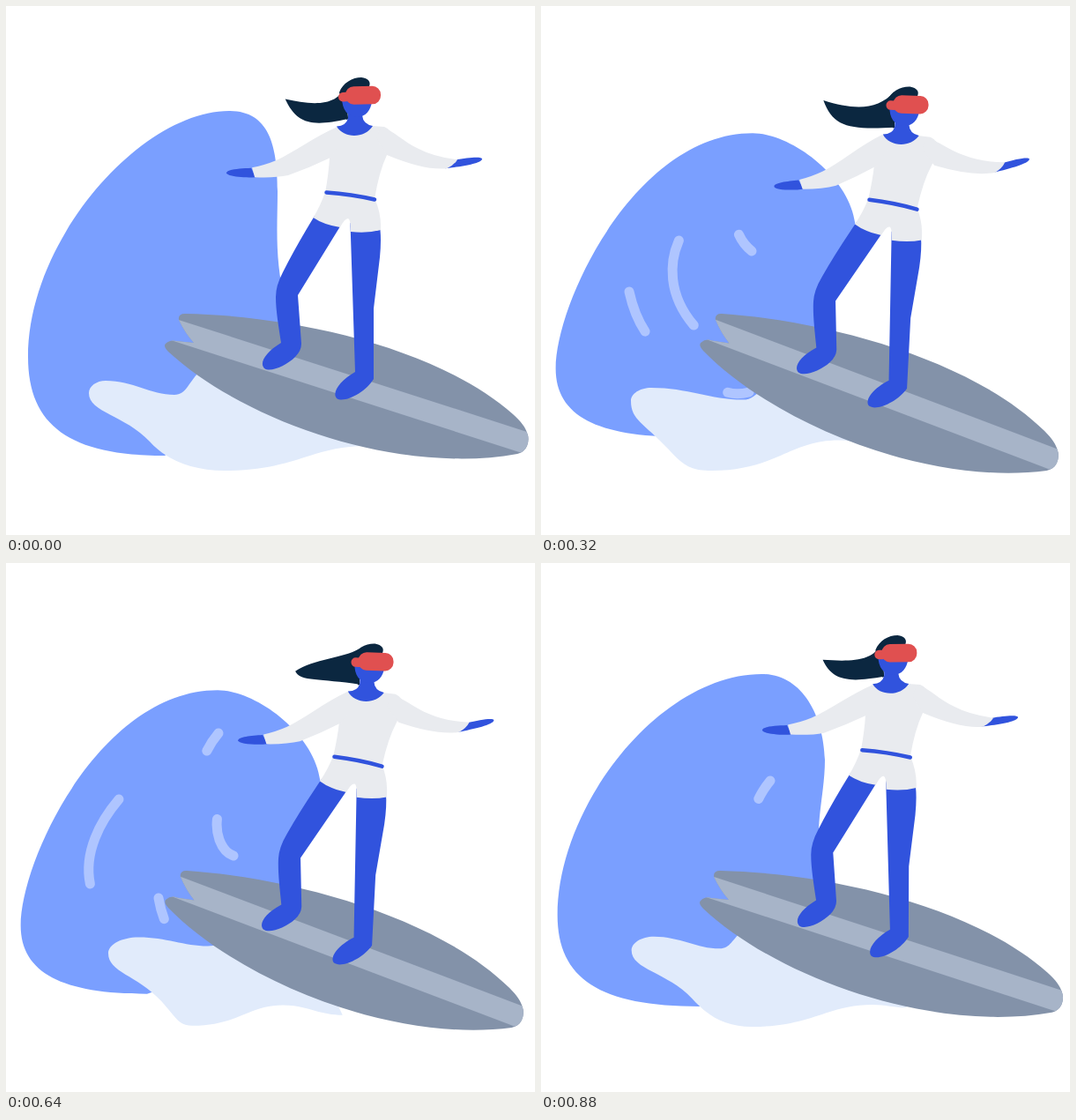
These frames come from a looping animation (600 px wide and 600 px high, 960 ms). An HTML page:

```html
<!DOCTYPE html>
<html lang="en">
<head>
<meta charset="utf-8">
<title>Surfer</title>
<style>
  html, body { margin: 0; width: 100%; height: 100%; overflow: hidden; background: #fff; }
  svg { display: block; width: 100vw; height: 100vh; }
  .skin { fill: #3153dd; }
  .cloth { fill: #e9ebef; }
  .hair { fill: #0b2740; }
  .mask { fill: #e05050; }
  #spray path { fill: none; stroke: #afc5ff; stroke-width: 11; stroke-linecap: round; }
</style>
</head>
<body>
<svg viewBox="0 0 600 600">
  <defs>
    <clipPath id="deck">
      <path id="outline" d="M203,349 C322,351 488,386 575,463 C585,472 589,478 591,484 Q594,491 591,499 Q588,506 580,508
        C450,532 273,474 184,392 Q178,386 181,383 Q186,378 193,380 L213,382 Q203,371 196,356 Q195,349 203,349Z"/>
    </clipPath>
  </defs>
  <path id="wave" fill="#7a9fff"/>
  <path id="foam" fill="#e1ebfb"/>
  <g id="spray"></g>
  <g class="tilt">
    <use href="#outline" fill="#8392a9"/>
    <path clip-path="url(#deck)" fill="#a7b4c8" d="M180,350.9 L610,489.1 L610,515 L180,376.8Z"/>
  </g>
  <path id="tail" class="hair"/>
  <g class="tilt">
    <path class="skin" d="M350,238 L379,250 L331,328 L335,383 Q335,391 328,398 C318,408 300,416 293,411
      C287,405 294,393 312,382 C309,362 306,345 306,330 Q306,317 314,302 Q328,274 350,238Z"/>
    <path class="skin" d="M390.5,246 L424,250 Q426,264 424,285 L417,343 L417,423 C408,438 384,451 375,445
      C369,438 380,424 396,415Z"/>
    <path class="cloth" d="M362,211 Q357,226 348.5,240 Q360,248 379,251 Q384,241 388,241 Q391,242 391,256
      Q410,258 425,254 Q426,236 418,218Z"/>
    <path class="cloth" d="M375,137 Q395,141 415,136 L429,137 Q437,140 440,150 L432,169 Q423,188 418,219
      L362,212 Q366,190 367,172 L362,150Z"/>
    <g id="armL">
      <path class="skin" d="M278,183.5 L283,194 C270,195 250,193 250,189 C250,185 265,184 278,183.5Z"/>
      <path class="cloth" d="M376,137 C350,148 325,167 306,175 Q294,180 279,183 L282,194 Q305,195 320,192
        Q345,183 368,172 L380,155Z"/>
    </g>
    <g id="armR">
      <path class="skin" d="M509,175 C525,172 540,171 540,174 C538,179 518,182 498,184.5Z"/>
      <path class="cloth" d="M425,137 C440,141 450,154 468,162 Q485,171 512,174.5 Q508,181 500,184.5
        Q475,187 432,169 L420,150Z"/>
    </g>
    <path fill="none" stroke="#3153dd" stroke-width="4.5" stroke-linecap="round" d="M363.5,211.5 Q392,213.5 418,219.5"/>
    <path class="hair" d="M386,129 L378,98 C382,87 393,81 403,81 C411,82 414,86 412,91 L388,97 L384,112 L388,128Z"/>
    <path class="skin" d="M388,118 L388,127 Q386,136 375,136.5 C383,150.5 407,150.5 416,136 Q405,134 404,124 L404,115Z"/>
    <path class="skin" d="M381,104 C381,118 388,126 398,126 C408,126 414,118 415,108Z"/>
    <g class="mask" transform="rotate(-1 404 101)">
      <rect x="377" y="97.5" width="14" height="10.5" rx="5"/>
      <rect x="385" y="91" width="40" height="20.5" rx="9.5"/>
    </g>
  </g>
</svg>
<script>
const STEP = 80, STEPS = 12, TILT = 3.9, HUB = [205, 391];
const $ = id => document.getElementById(id);
const tilted = document.querySelectorAll('.tilt');

// Key poses: bottom, left, left handle y, top handle x, top, top handle x, right handle, right, lower handle
const steep = [180,510, 25,398, 264, 154, 253,119, 298, 308,157, 308,210, 304,290];
const broad = [180,489, 6,402, 298, 97, 245,140, 290, 345,200, 350,250, 320,312];
const low = [120,488, 38,429, 411, 130, 230,153, 268, 358,178, 369,240, 322,317];
const WAVE = [[0, steep], [3, broad], [6, low], [9, broad]];

// rise, dip, crest, left, shoulder, bottom, hump, end
const FOAM = [
  [0, [222,412, 191,441, 113,425, 94,439, 163,494, 248,527, 408,499, 430,498]],
  [5, [262,440, 238,448, 128,435, 104,450, 140,505, 180,527, 320,491, 372,500]],
  [9, [246,424, 226,430, 158,421, 120,440, 188,494, 222,524, 312,505, 385,517]]
];

// two upper handles, tip, two lower handles
const TAIL = [
  [2, [376,119, 345,114, 311,97, 328,133, 340,141]],
  [5, [385,118, 360,120, 325,112, 333,140, 355,140]],
  [7, [384,106, 350,108, 331,127, 334,135, 360,129]]
];

// start step and curve
const SPRAY = [
  [0, 'M162,383 C145,388 128,382 118,369 C110,357 104,342 100,324'],
  [1, 'M215,392 C200,384 186,376 174,363 C143,327 146,290 156,267 C162,251 171,236 183,222'],
  [3, 'M239,278 C227,268 220,255 220,236 C223,220 231,205 241,193'],
  [3, 'M236,438 C216,443 203,437 191,425 C182,413 176,398 173,380'],
  [4, 'M164,438 C148,433 135,424 121,409 C85,373 92,335 101,312 C107,296 117,281 128,268'],
  [6, 'M258,332 C249,329 245,322 242,314 C236,297 240,280 247,267 C251,259 255,253 260,247']
].map(([start, d]) => {
  const path = document.createElementNS('http://www.w3.org/2000/svg', 'path');
  path.setAttribute('d', d);
  path.setAttribute('pathLength', 1);
  $('spray').append(path);
  return { start, path };
});

const clamp = v => Math.min(1, Math.max(0, v));
const swing = k => (1 - Math.cos(k / STEPS * 2 * Math.PI)) / 2;

// Linear blend of looping key poses
function pose(keys, k) {
  const n = keys.length;
  let i = keys.findLastIndex(([at]) => at <= k);
  if (i < 0) { i = n - 1; k += STEPS; }
  const [at, from] = keys[i], [next, to] = keys[(i + 1) % n];
  const f = (k - at) / ((next - at + STEPS) % STEPS);
  return from.map((v, j) => v + (to[j] - v) * f);
}

function spin(x, y, deg) {
  const a = deg * Math.PI / 180, c = Math.cos(a), s = Math.sin(a);
  const dx = x - HUB[0], dy = y - HUB[1];
  return [HUB[0] + dx * c - dy * s, HUB[1] + dx * s + dy * c];
}

function wavePath([bx, by, lx, ly, ly2, tx1, tx, ty, tx2, rx2, ry2, rx, ry, ex, ey]) {
  return `M${bx},${by} C${lx + 48},${by} ${lx},${ly + (by - ly) * .7} ${lx},${ly}
    C${lx},${ly2} ${tx1},${ty} ${tx},${ty} C${tx2},${ty} ${rx2},${ry2} ${rx},${ry}
    C${rx},${ry + 40} ${ex},${ey} 318,340 L300,440Z`;
}

function foamPath([rx, ry, dx, dy, tx, ty, lx, ly, sx, sy, bx, by, hx, hy, ex, ey]) {
  const w = rx - dx, v = dx - tx, u = hx - bx, e = ex - hx;
  return `M${rx},${ry} C${rx - w * .5},${ry + (dy - ry) * .5} ${dx + w * .45},${dy} ${dx},${dy}
    C${dx - v * .35},${dy} ${tx + v * .4},${ty} ${tx},${ty}
    C${tx - (tx - lx) * .55},${ty} ${lx},${ly - (ly - ty) * .55} ${lx},${ly}
    C${lx},${ly + 22} ${sx - 28},${sy - 30} ${sx},${sy}
    C${sx + 18},${sy + 20} ${bx - (bx - sx) * .45},${by} ${bx},${by}
    C${bx + u * .5},${by} ${hx - u * .38},${hy} ${hx},${hy}
    C${hx + e * .4},${hy} ${ex - e * .4},${ey} ${ex},${ey} L${ex - 20},${ey - 42}Z`;
}

function draw(k) {
  const tilt = TILT * swing(k), arm = swing(k + .5);
  tilted.forEach(g => g.setAttribute('transform', `rotate(${tilt} ${HUB})`));
  $('armL').setAttribute('transform', `rotate(${-7.2 * arm} 372 150)`);
  $('armR').setAttribute('transform', `rotate(${-10.9 * arm} 432 150)`);
  $('wave').setAttribute('d', wavePath(pose(WAVE, k)));
  $('foam').setAttribute('d', foamPath(pose(FOAM, k)));

  const h = pose(TAIL, k);
  $('tail').setAttribute('d', `M${spin(385, 88, tilt)} C${h.slice(0, 6)} C${h.slice(6)} ${spin(388, 128, tilt)}Z`);

  // Each stroke runs its curve in four steps; its end follows two steps behind
  SPRAY.forEach(({ start, path }) => {
    const head = clamp((k - start) / 4), end = clamp((k - start - 2) / 4);
    path.style.display = head > end ? '' : 'none';
    path.setAttribute('stroke-dasharray', `${head - end} 2`);
    path.setAttribute('stroke-dashoffset', -end);
  });
}

const start = performance.now();
function tick() {
  draw(Math.floor((performance.now() - start) / STEP) % STEPS);
  requestAnimationFrame(tick);
}
tick();
</script>
</body>
</html>
```
